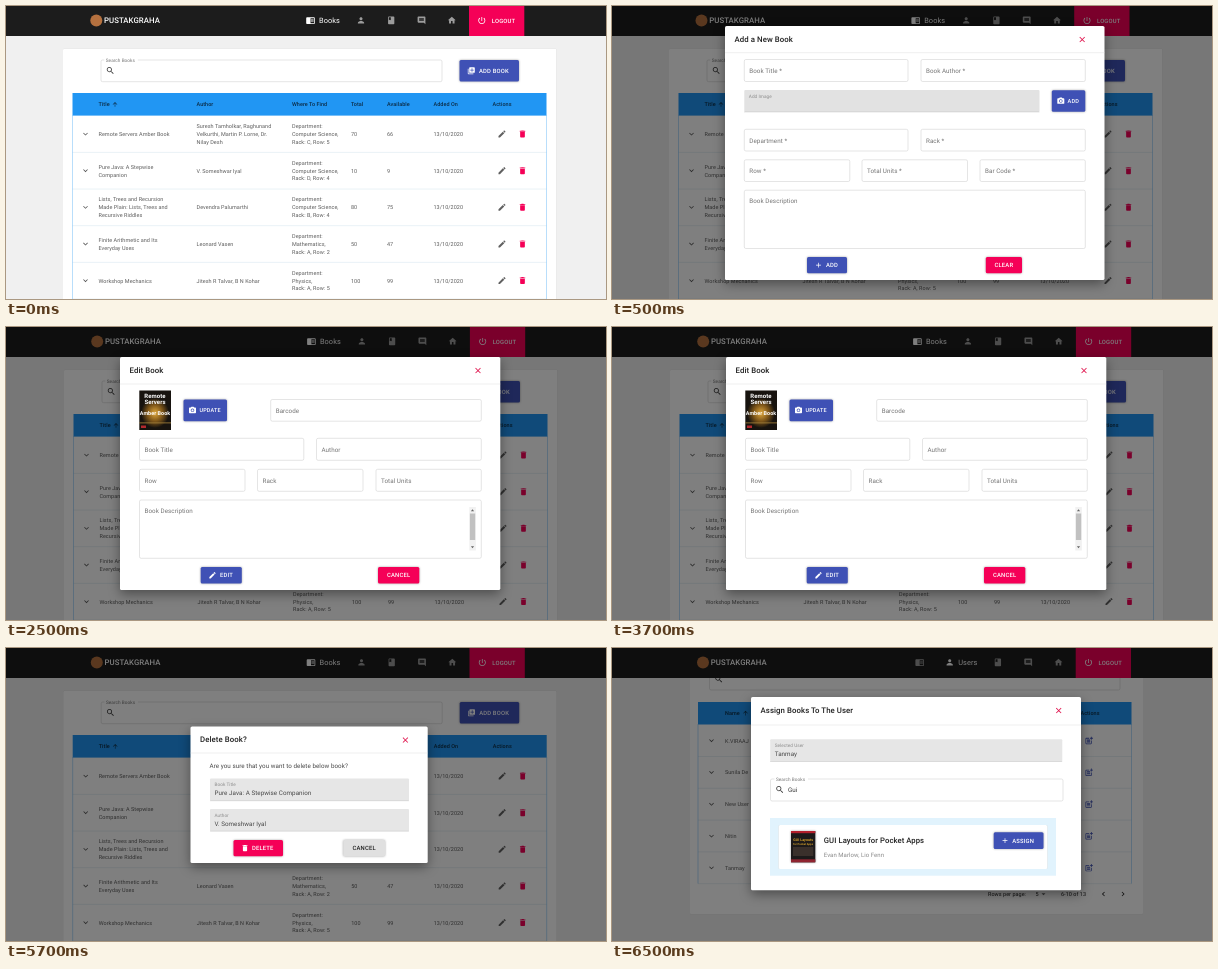
An HTML page for the animation above (8000 ms loop, 600x293 px).

```html
<!DOCTYPE html>
<html lang="en">
<head>
<meta charset="utf-8">
<title>Library dashboard</title>
<style>
  html, body { margin: 0; width: 100%; height: 100%; overflow: hidden; background: #f0f0f0; }
  svg.stage { display: block; width: 100vw; height: 100vh; }
  text { font-family: Roboto, Arial, sans-serif; letter-spacing: .009em; text-rendering: geometricPrecision; white-space: pre; }
  .btn { letter-spacing: .028em; font-weight: 500; }
  .raised { filter: drop-shadow(0 .8px .8px rgba(0, 0, 0, .35)); }
  .paper { filter: drop-shadow(0 .4px .7px rgba(0, 0, 0, .2)); }
  .dialog { filter: drop-shadow(0 4px 6px rgba(0, 0, 0, .4)); }

  /* Every scene is opaque and covers the ones before it. */
  .scene { animation: 8s step-end infinite; }
  #add { animation-name: add; }
  #edit { animation-name: edit; }
  #remove { animation-name: remove; }
  #assign { animation-name: assign; }
  @keyframes add { 0% { opacity: 0 } 6.25%, 100% { opacity: 1 } }
  @keyframes edit { 0% { opacity: 0 } 31.25%, 100% { opacity: 1 } }
  @keyframes remove { 0% { opacity: 0 } 56.25%, 100% { opacity: 1 } }
  @keyframes assign { 0% { opacity: 0 } 81.25%, 100% { opacity: 1 } }
</style>
</head>
<body>
<svg class="stage" viewBox="0 0 600 293" preserveAspectRatio="none">
  <defs>
    <radialGradient id="glow">
      <stop offset="0" stop-color="#e0a83c"/>
      <stop offset=".55" stop-color="#7d5518"/>
      <stop offset="1" stop-color="#17130f"/>
    </radialGradient>
  </defs>
  <g id="books"></g>
  <g id="add" class="scene"></g>
  <g id="edit" class="scene"></g>
  <g id="remove" class="scene"></g>
  <g id="assign" class="scene"></g>
</svg>
<script>
const BLUE = '#3f51b5', PINK = '#f50057', SKY = '#2196f3', GREY = '#757575', INK = '#212121';

const ICONS = {
  reader: 'M13 12h7v1.5h-7zm0-2.5h7V11h-7zm0 5h7V16h-7zM21 4H3c-1.1 0-2 .9-2 2v13c0 1.1.9 2 2 2h18c1.1 0 2-.9 2-2V6c0-1.1-.9-2-2-2zm0 15h-9V6h9v13z',
  person: 'M12 12c2.21 0 4-1.79 4-4s-1.79-4-4-4-4 1.79-4 4 1.79 4 4 4zm0 2c-2.67 0-8 1.34-8 4v2h16v-2c0-2.66-5.33-4-8-4z',
  book: 'M18 2H6c-1.1 0-2 .9-2 2v16c0 1.1.9 2 2 2h12c1.1 0 2-.9 2-2V4c0-1.1-.9-2-2-2zM6 4h5v8l-2.5-1.5L6 12V4z',
  chat: 'M20 2H4c-1.1 0-2 .9-2 2v12c0 1.1.9 2 2 2h14l4 4V4c0-1.1-.9-2-2-2zm-2 12H6v-2h12v2zm0-3H6V9h12v2zm0-3H6V6h12v2z',
  home: 'M10 20v-6h4v6h5v-8h3L12 3 2 12h3v8z',
  power: 'M13 3h-2v10h2V3zm4.83 2.17l-1.42 1.42C17.99 7.86 19 9.81 19 12c0 3.87-3.13 7-7 7s-7-3.13-7-7c0-2.19 1.01-4.14 2.58-5.42L6.17 5.17C4.23 6.82 3 9.26 3 12c0 4.97 4.03 9 9 9s9-4.03 9-9c0-2.74-1.23-5.18-3.17-6.83z',
  search: 'M15.5 14h-.79l-.28-.27C15.41 12.59 16 11.11 16 9.5 16 5.91 13.09 3 9.5 3S3 5.91 3 9.5 5.91 16 9.5 16c1.61 0 3.09-.59 4.23-1.57l.27.28v.79l5 4.99L20.49 19l-4.99-5zm-6 0C7.01 14 5 11.99 5 9.5S7.01 5 9.5 5 14 7.01 14 9.5 11.99 14 9.5 14z',
  addBook: 'M4 6H2v14c0 1.1.9 2 2 2h14v-2H4V6zm16-4H8c-1.1 0-2 .9-2 2v12c0 1.1.9 2 2 2h12c1.1 0 2-.9 2-2V4c0-1.1-.9-2-2-2zm-1 9h-4v4h-2v-4H9V9h4V5h2v4h4v2z',
  pencil: 'M3 17.25V21h3.75L17.81 9.94l-3.75-3.75L3 17.25zM20.71 7.04c.39-.39.39-1.02 0-1.41l-2.34-2.34c-.39-.39-1.02-.39-1.41 0l-1.83 1.83 3.75 3.75 1.83-1.83z',
  bin: 'M6 19c0 1.1.9 2 2 2h8c1.1 0 2-.9 2-2V7H6v12zM19 4h-3.5l-1-1h-5l-1 1H5v2h14V4z',
  down: 'M7.41 8.59L12 13.17l4.59-4.58L18 10l-6 6-6-6z',
  up: 'M4 12l1.41 1.41L11 7.83V20h2V7.83l5.58 5.59L20 12l-8-8-8 8z',
  close: 'M19 6.41L17.59 5 12 10.59 6.41 5 5 6.41 10.59 12 5 17.59 6.41 19 12 13.41 17.59 19 19 17.59 13.41 12z',
  camera: 'M12 8.8a3.2 3.2 0 100 6.4 3.2 3.2 0 000-6.4zM9 2L7.17 4H4c-1.1 0-2 .9-2 2v12c0 1.1.9 2 2 2h16c1.1 0 2-.9 2-2V6c0-1.1-.9-2-2-2h-3.17L15 2H9zm3 15c-2.76 0-5-2.24-5-5s2.24-5 5-5 5 2.24 5 5-2.24 5-5 5z',
  plus: 'M19 13h-6v6h-2v-6H5v-2h6V5h2v6h6v2z',
  left: 'M15.41 7.41L14 6l-6 6 6 6 1.41-1.41L10.83 12z',
  right: 'M10 6L8.59 7.41 13.17 12l-4.58 4.59L10 18l6-6z',
  caret: 'M7 10l5 5 5-5z',
  assign: 'M17 19.22H5V7h7V5H5c-1.1 0-2 .9-2 2v12c0 1.1.9 2 2 2h12c1.1 0 2-.9 2-2v-7h-2v7.22zM19 2h-2v3h-3v2h3v3h2V7h3V5h-3zM7 9h8v2H7zM7 12v2h8v-2zM7 15h8v2H7z'
};

// Boxes are given by their edges; text and icons by their vertical centre.
const box = (x1, y1, x2, y2, fill, more = '') =>
  `<rect x="${x1}" y="${y1}" width="${x2 - x1}" height="${y2 - y1}" fill="${fill}" ${more}/>`;
const line = (x1, y1, x2, y2, color, more = '') =>
  `<path d="M${x1} ${y1}L${x2} ${y2}" stroke="${color}" stroke-width=".45" ${more}/>`;
const text = (x, y, str, size = 5.47, fill = '#5c5c5c', more = '') =>
  `<text x="${x}" y="${y + size * .36}" font-size="${size}" fill="${fill}" ${more}>${str}</text>`;
const icon = (name, x, y, fill, size = 9.4) =>
  `<path transform="translate(${x - size / 2} ${y - size / 2}) scale(${size / 24})" d="${ICONS[name]}" fill="${fill}"/>`;
const shift = (dx, body) => `<g transform="translate(${dx} 0)">${body}</g>`;
const dim = () => box(0, 0, 600, 293, '#000', 'opacity=".5"');

function button(x1, y1, x2, y2, label, o = {}) {
  const { fill = BLUE, ink = '#fff', glyph, gx, tx, size = 5.86 } = o;
  const y = (y1 + y2) / 2;
  return box(x1, y1, x2, y2, fill, 'rx="1.5" class="raised"') +
    (glyph ? icon(glyph, gx, y, ink, 8.4) : '') +
    text(tx || (x1 + x2) / 2, y, label, size, ink, `class="btn" ${tx ? '' : 'text-anchor="middle"'}`);
}

const outline = (x1, y1, x2, y2) =>
  box(x1, y1, x2, y2, 'none', 'rx="1.6" stroke="#c4c4c4" stroke-width=".45"');
const field = (x1, y1, x2, y2, label) =>
  outline(x1, y1, x2, y2) + text(x1 + 5, y1 + 11, label, 6.25, GREY);
const searchField = (x1, y1, x2, y2, lx) =>
  outline(x1, y1, x2, y2) + box(lx - 1.5, y1 - 1, lx + 32, y1 + 1, '#fff') +
  text(lx, y1, 'Search Books', 4.69, GREY) +
  icon('search', x1 + 9.3, y1 + 10.6, '#333');
const filled = (x1, y1, x2, y2, label, value = '', fill = '#e6e6e6') =>
  box(x1, y1, x2, y2, fill, 'rx="1"') +
  line(x1, y2, x2, y2, '#8a8a8a', 'stroke-dasharray=".5 .5"') +
  text(x1 + 4.5, y1 + 6.3, label, 4.69, '#8c8c8c') +
  text(x1 + 4.5, y1 + 14.7, value, 6.25, '#484848');

const dialog = (x1, y1, x2, y2, title, rule) =>
  box(x1, y1, x2, y2, '#fff', 'rx="1.6" class="dialog"') +
  text(x1 + 9.6, y1 + 13, title, 7.8, INK, 'font-weight="500"') +
  icon('close', x2 - 22.3, y1 + 13.6, '#e0164f') +
  line(x1, rule, x2, rule, '#dcdcdc');

function header(active) {
  const dull = '#9c9c9c', users = active === 'Users';
  return box(-5, 0, 605, 30, '#1c1c1c') +
    '<circle cx="90.3" cy="14.6" r="6" fill="#b5713f"/>' +
    text(98, 14.5, 'PUSTAKGRAHA', 7.8, '#fff', 'font-weight="500"') +
    icon('reader', users ? 307 : 304.5, 14.5, users ? dull : '#fff') +
    icon('person', users ? 337 : 355, 14.3, users ? '#fff' : dull) +
    text(users ? 345.5 : 313, 14.8, active, 7.4, '#fff') +
    icon('book', 385.2, 14.3, dull) + icon('chat', 415.5, 14.3, dull) + icon('home', 445.8, 14.3, dull) +
    box(463, 0, 518.3, 30, PINK) + icon('power', 475.8, 14.5, '#fff') +
    text(485.8, 14.6, 'LOGOUT', 5.86, '#fff', 'class="btn"');
}

const ROWS = [
  [['Remote Servers Amber Book'], ['Suresh Tamholkar, Raghunand', 'Velkurthi, Martin P. Lorne, Dr.', 'Nilay Desh'], 'Computer Science', 'C', 5, 70, 66],
  [['Pure Java: A Stepwise', 'Companion'], ['V. Someshwar Iyal'], 'Computer Science', 'D', 4, 10, 9],
  [['Lists, Trees and Recursion', 'Made Plain: Lists, Trees and', 'Recursive Riddles'], ['Devendra Palumarthi'], 'Computer Science', 'B', 4, 80, 75],
  [['Finite Arithmetic and Its', 'Everyday Uses'], ['Leonard Vasen'], 'Mathematics', 'A', 2, 50, 47],
  [['Workshop Mechanics'], ['Jitesh R Talvar, B N Kohar'], 'Physics', 'A', 5, 100, 99]
];

const lines = (x, y, list) =>
  list.map((s, i) => text(x, y + (i - (list.length - 1) / 2) * 7.82, s)).join('');

const headings = (y, list) =>
  list.map(([x, s]) => text(x, y, s, 5.47, '#0c2c47', 'font-weight="500"')).join('');

function bookRow([title, author, dept, rack, row, total, left], i) {
  const y = 128 + i * 36.65;
  return icon('down', 79.5, y, '#555') + lines(92.5, y, title) + lines(190.5, y, author) +
    lines(286, y, ['Department:', dept + ',', `Rack: ${rack}, Row: ${row}`]) +
    text(345, y, total) + text(381, y, left) + text(427.5, y, '13/10/2020') +
    icon('pencil', 496, y, '#616161') + icon('bin', 516.5, y, PINK) +
    line(66.5, y + 18.4, 540.5, y + 18.4, '#cfdfea');
}

const booksPage = (dx = 0, navDx = 0) =>
  box(0, 0, 600, 293, '#f0f0f0') +
  shift(dx,
    box(57, 42.5, 550.5, 300, '#fff', 'rx="1.6" class="paper"') +
    searchField(95, 54, 436, 75.7, 99.8) +
    button(453.5, 54, 513, 75.5, 'ADD BOOK', { glyph: 'addBook', gx: 465.3, tx: 473 }) +
    box(66.5, 87, 540.5, 109.6, SKY) +
    headings(98.5, [[92.5, 'Title'], [190.5, 'Author'], [286, 'Where To Find'], [345, 'Total'],
      [381, 'Available'], [427.5, 'Added On'], [486.5, 'Actions']]) +
    icon('up', 109, 98.4, '#0c2c47', 7) +
    ROWS.map(bookRow).join('') +
    line(66.5, 109, 66.5, 300, '#64b5f6') + line(540.5, 109, 540.5, 300, '#64b5f6')) +
  shift(navDx, header('Books'));

const USERS = ['K.VIRAAJ', 'Sunila De', 'New User', 'Nitin', 'Tanmay'];

const userRow = (name, i) => {
  const y = 92.6 + i * 31.8;
  return icon('down', 99.5, y, '#555') + text(113, y, name) + icon('assign', 477, y, BLUE) +
    line(86, y + 15.9, 519.5, y + 15.9, '#cfdfea');
};

const usersPage = () =>
  box(0, 0, 600, 293, '#f0f0f0') +
  box(78, 10, 531, 266.5, '#fff', 'rx="1.6" class="paper"') +
  searchField(97.5, 20.5, 508, 42, 102) +
  box(86, 54, 519.5, 76.5, SKY) +
  headings(65.3, [[113, 'Name'], [468.5, 'Actions']]) + icon('up', 133.5, 65.2, '#0c2c47', 7) +
  USERS.map(userRow).join('') +
  line(86, 76, 86, 235.6, '#64b5f6') + line(519.5, 76, 519.5, 235.6, '#64b5f6') +
  text(376, 246, 'Rows per page:', 5.47, INK) + text(423.5, 246, '5', 5.47, INK) +
  icon('caret', 431.5, 246, '#616161') + text(449, 246, '6-10 of 13', 5.47, INK) +
  icon('left', 491.5, 246, INK) + icon('right', 511, 246, INK) +
  shift(.7, header('Users'));

const coverLine = (x, y, s, size, fill = '#fff') =>
  text(x, y, s, size, fill, 'font-weight="700" text-anchor="middle"');

const serverCover = () =>
  box(133.3, 63.5, 165, 103, '#17130f') +
  '<ellipse cx="149" cy="86" rx="14" ry="15" fill="url(#glow)"/>' +
  coverLine(149, 68.8, 'Remote', 6) + coverLine(149, 75.2, 'Servers', 6) +
  coverLine(149, 86.5, 'Amber Book', 5.4) +
  box(133.3, 95.5, 165, 96.3, '#a8843c') + box(135, 98.5, 140, 101, '#b3282d');

const guiCover = () =>
  box(179, 183, 203.3, 214.3, '#1d1a1a', 'class="raised"') +
  box(179, 183, 203.3, 185.2, '#b3202c') +
  coverLine(191.2, 191.5, 'GUI Layouts', 3.6, '#d8a32c') +
  coverLine(191.2, 195.8, 'for Pocket Apps', 2.7, '#d8a32c') +
  box(181, 199, 201.3, 208, '#3a302b') + box(179, 211.3, 203.3, 214.3, '#8f2430');

const scenes = {
  books: booksPage(),

  add: booksPage(0, -.8) + dim() +
    dialog(113, 20, 492.5, 274, 'Add a New Book', 46.7) +
    field(132.3, 53.5, 296, 75.5, 'Book Title *') + field(309, 53.5, 473.3, 75.5, 'Book Author *') +
    filled(132.3, 84, 427.5, 106, 'Add Image', '', '#e2e2e2') +
    button(439.8, 84.3, 473.3, 105.8, 'ADD', { glyph: 'camera', gx: 448.8, tx: 455.5, size: 5.6 }) +
    field(132.3, 123.3, 296, 145, 'Department *') + field(309, 123.3, 473.3, 145, 'Rack *') +
    field(132.3, 153.8, 237.8, 175.5, 'Row *') + field(250, 153.8, 355.5, 175.5, 'Total Units *') +
    field(368, 153.8, 473.3, 175.5, 'Bar Code *') +
    field(132.3, 184.2, 473.3, 242.5, 'Book Description') +
    button(195, 251, 235, 267.3, 'ADD', { glyph: 'plus', gx: 206.5, tx: 214 }) +
    button(373.8, 251, 410, 267.3, 'CLEAR', { fill: PINK }),

  edit: booksPage(1, .9) + dim() +
    dialog(114, 30, 494.3, 263, 'Edit Book', 57) + serverCover() +
    button(177.5, 72.5, 221, 94.2, 'UPDATE', { glyph: 'camera', gx: 186.5, tx: 193.5, size: 5.47 }) +
    field(264.7, 72.5, 475.3, 94.2, 'Barcode') +
    field(133.5, 111.3, 297.8, 133.3, 'Book Title') + field(310.5, 111.3, 475.3, 133.3, 'Author') +
    field(133.5, 142.3, 239, 164.3, 'Row') + field(251.5, 142.3, 357, 164.3, 'Rack') +
    field(370, 142.3, 475.3, 164.3, 'Total Units') +
    field(133.5, 173, 475.3, 231.3, 'Book Description') +
    box(463.3, 180, 469.8, 223.5, '#f1f1f1') + box(463.9, 186.5, 469.2, 213, '#c1c1c1') +
    '<path d="M464.9 184.3l1.6-2 1.6 2zM464.9 219.3l1.6 2 1.6-2z" fill="#666"/>' +
    button(194.7, 240, 235.8, 256.5, 'EDIT', { glyph: 'pencil', gx: 206.5, tx: 214 }) +
    button(372, 240, 413.3, 256.5, 'CANCEL', { fill: PINK }),

  remove: booksPage(.2, .5) + dim() +
    dialog(184.5, 78.5, 421.7, 215, 'Delete Book?', 105) +
    text(203.5, 117.5, 'Are you sure that you want to delete below book?', 6.25, '#484848') +
    filled(204, 130.5, 403, 152.7, 'Book Title', 'Pure Java: A Stepwise Companion') +
    filled(204, 161, 403, 183.2, 'Author', 'V. Someshwar Iyal') +
    button(227.5, 192, 277, 208.2, 'DELETE', { fill: PINK, glyph: 'bin', gx: 239, tx: 246 }) +
    button(337.3, 192, 379, 208.2, 'CANCEL', { fill: '#e0e0e0', ink: INK }),

  assign: usersPage() + dim() +
    dialog(139, 49, 469, 242.3, 'Assign Books To The User', 77) +
    filled(158.2, 91.3, 450.3, 113.5, 'Selected User', 'Tanmay') +
    searchField(158.5, 131, 451, 153, 164) + text(176, 142, 'Gui', 6.25, '#333') +
    box(158, 170, 444, 227.7, '#e1f3fd') +
    box(166.5, 177, 435.5, 221, '#fff', 'rx="1.6" class="paper"') + guiCover() +
    text(211.8, 192, 'GUI Layouts for Pocket Apps', 7.7, INK, 'font-weight="500"') +
    text(211.8, 206.5, 'Evan Marlow, Lio Fenn', 6, '#8a8a8a') +
    button(381.7, 184.3, 431.5, 201, 'ASSIGN', { glyph: 'plus', gx: 393, tx: 400.3 })
};

for (const id in scenes) document.getElementById(id).innerHTML = scenes[id];
</script>
</body>
</html>
```
